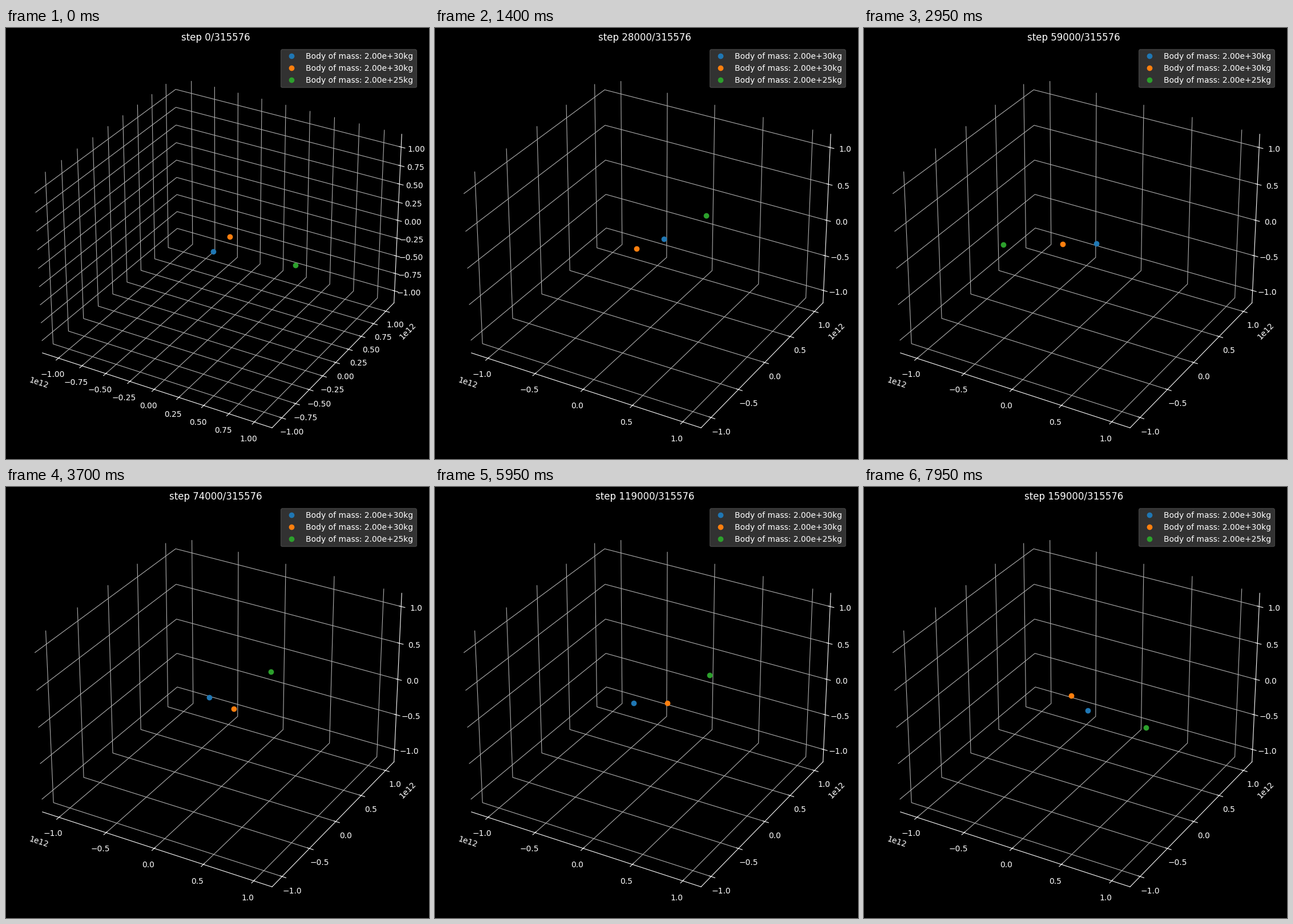
Recreate the animation shown at these times as a matplotlib script. Size 741 by 756 pixels, loop 8 s.

```python
import math

import matplotlib.pyplot as plt
from matplotlib.animation import FuncAnimation
from matplotlib.ticker import MultipleLocator

W, H, DPI = 741, 756, 100
FRAMES, INTERVAL = 160, 50
STEPS_PER_FRAME, TOTAL_STEPS = 1000, 315576

G = 6.674e-11
STAR, PLANET = 2e30, 2e25
R_STAR, R_PLANET = 1.5e11, 7.5e11
FRAME_TIME = 1e7          # simulated seconds per frame
SUBSTEPS = 100

OMEGA = math.sqrt(G * STAR / (4 * R_STAR ** 3))


def star(t):
    """Circular orbit of the first star; the second one is opposite."""
    a = OMEGA * t - math.pi / 2
    return R_STAR * complex(math.cos(a), math.sin(a))


def pull(p, t):
    s = star(t)
    return sum(G * STAR * (q - p) / abs(q - p) ** 3 for q in (s, -s))


def planet_path():
    """Leapfrog integration of the light body around the pair."""
    dt = FRAME_TIME / SUBSTEPS
    p = complex(R_PLANET, 0)
    v = 1j * math.sqrt(2 * G * STAR / R_PLANET)
    path = [p]
    for i in range((FRAMES - 1) * SUBSTEPS):
        v += pull(p, i * dt) * dt / 2
        p += v * dt
        v += pull(p, (i + 1) * dt) * dt / 2
        if (i + 1) % SUBSTEPS == 0:
            path.append(p)
    return path


planet = planet_path()

plt.rcParams.update({
    "font.family": "DejaVu Sans",
    "text.color": "white",
    "axes.edgecolor": "white",
    "axes.labelcolor": "white",
    "xtick.color": "white",
    "ytick.color": "white",
    "grid.color": "#b0b0b0",
    "axes3d.xaxis.panecolor": (0, 0, 0, 0),
    "axes3d.yaxis.panecolor": (0, 0, 0, 0),
    "axes3d.zaxis.panecolor": (0, 0, 0, 0),
})

SIDE = 716.1
fig = plt.figure(figsize=(W / DPI, H / DPI), dpi=DPI, facecolor="black")
ax = fig.add_axes([9.7 / W, 9.5 / H, SIDE / W, SIDE / H],
                  projection="3d", facecolor="black")
ax.zaxis.offsetText.set_visible(False)

dots = [ax.plot([0], [0], [0], "o", label=f"Body of mass: {m:.2e}kg")[0]
        for m in (STAR, STAR, PLANET)]
ax.legend(loc="upper right", facecolor="white", framealpha=0.2)
title = ax.set_title("")


def set_view(k):
    reach = 1.5 * max(abs(p) for p in planet[:k + 1])
    lim = reach * 25 / 24
    ax.set(xlim=(-lim, lim), ylim=(-lim, lim), zlim=(-lim, lim))
    step = 2.5e11 if k == 0 else 5e11
    for axis in (ax.xaxis, ax.yaxis, ax.zaxis):
        axis.set_major_locator(MultipleLocator(step))


def draw(k):
    set_view(k)
    s = star(k * FRAME_TIME)
    for dot, p in zip(dots, (s, -s, planet[k])):
        dot.set_data_3d([p.real], [p.imag], [0])
    title.set_text(f"step {k * STEPS_PER_FRAME}/{TOTAL_STEPS}")
    return [*dots, title]


anim = FuncAnimation(fig, draw, frames=FRAMES, interval=INTERVAL,
                     init_func=lambda: draw(0), repeat=True, repeat_delay=0)
plt.show()
```
